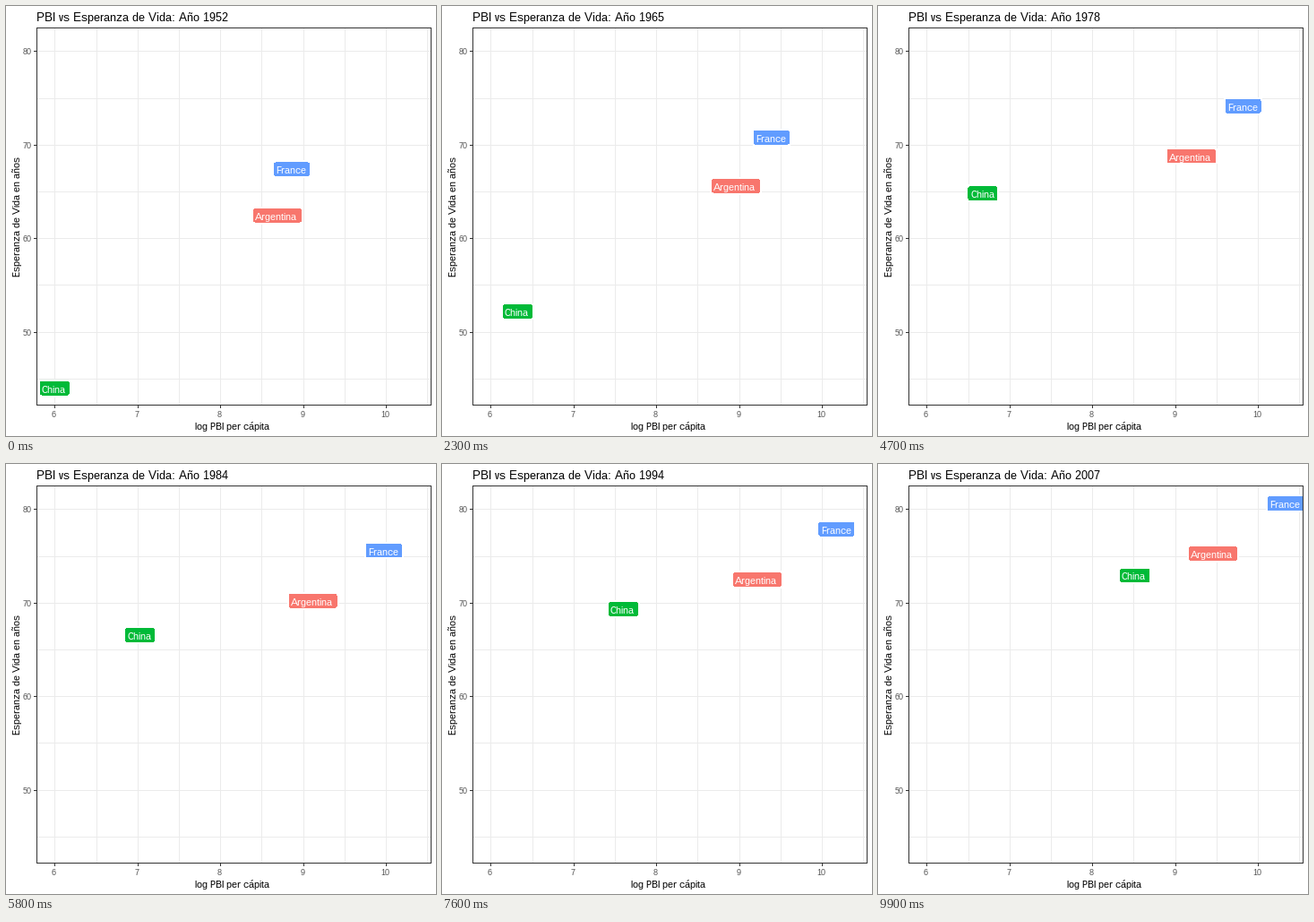
A matplotlib script that plays this animation: 480x480 px, repeating every 10 s.

```python
import numpy as np
import matplotlib.pyplot as plt
from matplotlib.animation import FuncAnimation
from matplotlib.patches import FancyBboxPatch, Rectangle

plt.rcParams.update({
    "font.family": "Liberation Sans",
    "text.hinting": "native",
    "text.hinting_factor": 1,
})

SIZE, FRAMES, INTERVAL = 480, 100, 100
START, END = 1952, 2007
LEFT, RIGHT, TOP, BOTTOM = 34, 474, 24, 445
GRID, BORDER, TICK_TEXT = "#EBEBEB", "#333333", "#4D4D4D"
BOX_H = 17.75


def bow(first, last, bend):
    """Steady growth with a slight arch."""
    def value(year):
        t = (year - START) / (END - START)
        return first + (last - first) * t + bend * t * (1 - t)
    return value


def turns(**points):
    """Straight runs between turning points, given as y<year>=value."""
    years = [int(k[1:]) for k in points]
    values = list(points.values())
    return lambda year: np.interp(year, years, values)


# name, fill, box width, log GDP, life expectancy
COUNTRIES = [
    ("Argentina", "#F8766D", 56,
     turns(y1952=8.685, y1977=9.218, y1982=9.105, y1992=9.139,
           y1997=9.303, y2002=9.082, y2007=9.456),
     bow(62.49, 75.32, 1.0)),
    ("China", "#00BA38", 35,
     turns(y1952=5.993, y1957=6.356, y1962=6.190, y1967=6.418,
           y1977=6.608, y2002=8.045, y2007=8.509),
     turns(y1952=44, y1957=50.55, y1962=44.5, y1967=58.38,
           y1972=63.12, y2007=72.96)),
    ("France", "#619CFF", 42,
     bow(8.858, 10.325, 1.05),
     bow(67.41, 80.66, 1.9)),
]


def px(v):
    return 54.35 + 92.42 * (v - 6)


def py(v):
    return 363.55 - 10.436 * (v - 50)


fig = plt.figure(figsize=(SIZE / 72, SIZE / 72), dpi=72, facecolor="white")
ax = fig.add_axes([0, 0, 1, 1])
ax.set_xlim(0, SIZE)
ax.set_ylim(SIZE, 0)
ax.axis("off")


def bar(x, y, w, h, color, z):
    ax.add_patch(Rectangle((x, y), w, h, fc=color, lw=0,
                           antialiased=False, zorder=z))


def write(x, y, s, size, color="black", **kw):
    return ax.text(x, y, s, fontsize=size, color=color,
                   va=kw.pop("va", "baseline"), **kw)


# Grid, ticks and tick labels
for v in np.arange(6, 10.6, 0.5):
    x = round(px(v))
    bar(x, TOP, 1, BOTTOM - TOP, GRID, 1)
    if v % 1 == 0:
        bar(x, BOTTOM + 1, 1, 3, BORDER, 1)
        write(x - 1, 459, f"{v:.0f}", 9, TICK_TEXT, ha="center")
for v in range(45, 81, 5):
    y = round(py(v))
    bar(LEFT, y, RIGHT - LEFT, 1, GRID, 1)
    if v % 10 == 0:
        bar(LEFT - 3, y, 3, 1, BORDER, 1)
        write(29, y + 4, str(v), 9, TICK_TEXT, ha="right")

# Panel border
for y in (TOP, BOTTOM):
    bar(LEFT, y, RIGHT - LEFT + 1, 1, BORDER, 5)
for x in (LEFT, RIGHT):
    bar(x, TOP, 1, BOTTOM - TOP + 1, BORDER, 5)

title = write(34, 17, "", 13)
write(252.5, 473, "log PBI per cápita", 11, ha="center")
write(18, 235.5, "Esperanza de Vida en años", 11, rotation=90,
      ha="right", va="center")

labels = []
for name, fill, width, log_gdp, life in COUNTRIES:
    box = FancyBboxPatch((0, 0), width, BOX_H, fc=fill, ec="white", lw=1,
                         boxstyle="round,pad=0,rounding_size=2.6",
                         antialiased=False, snap=False, zorder=3)
    ax.add_patch(box)
    text = write(0, 0, name, 11, "white", zorder=4)
    labels.append((box, text, width, log_gdp, life))


def update(i):
    year = START + (END - START) * i / (FRAMES - 1)
    title.set_text(f"PBI vs Esperanza de Vida: Año {round(year)}")
    for box, text, width, log_gdp, life in labels:
        x = px(log_gdp(year)) + 0.5
        y = py(life(year)) + 0.5
        box.set_x(x - width / 2)
        box.set_y(y - BOX_H / 2)
        text.set_position((round(x - width / 2 + 3.2), round(y + 5)))
    return []


anim = FuncAnimation(fig, update, frames=FRAMES, interval=INTERVAL,
                     repeat=True, repeat_delay=0, blit=False)
plt.show()
```
